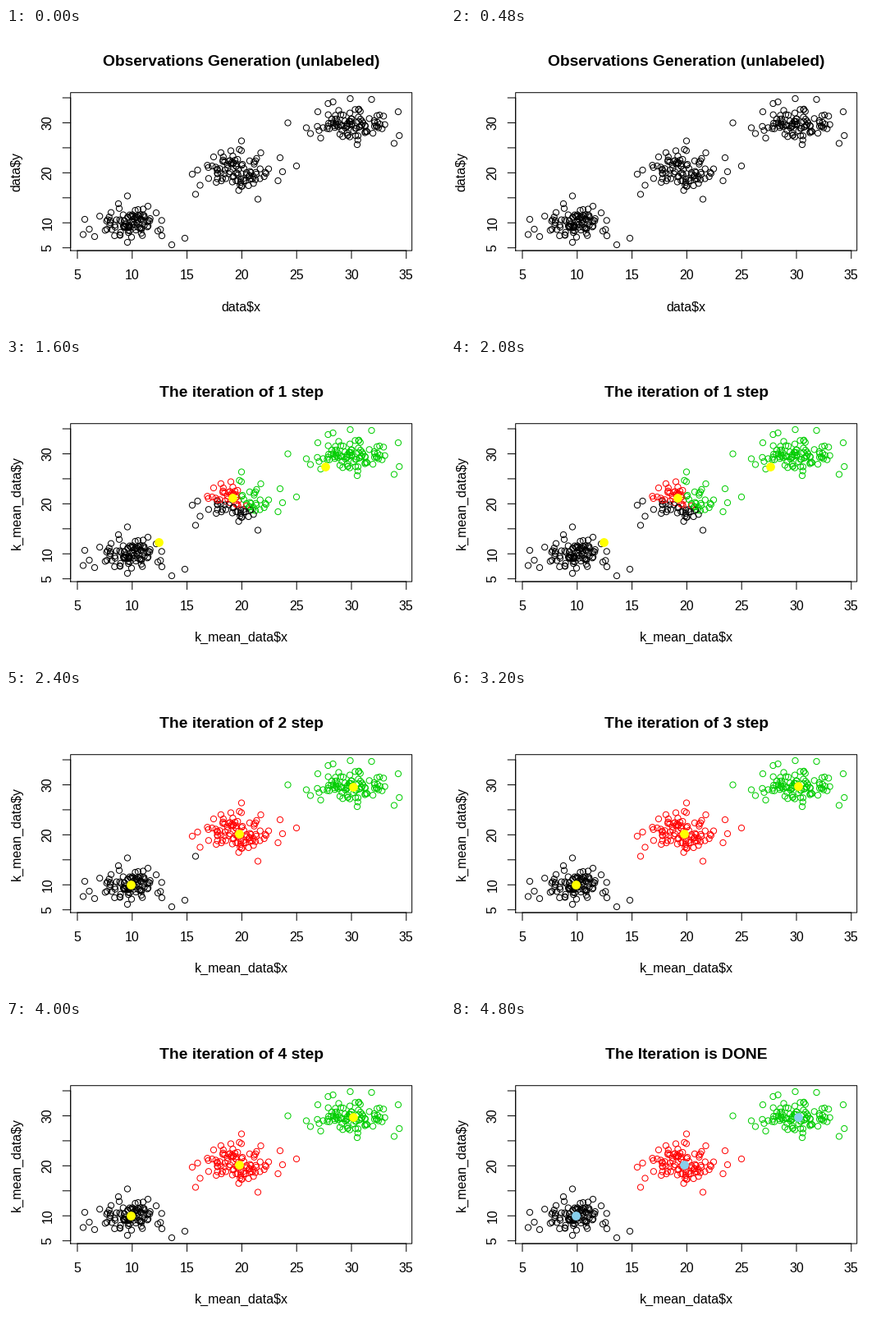
Write a matplotlib script that moves like this. It is 535x369 px and loops after 5.6 s.

```python
import numpy as np
import matplotlib.pyplot as plt
from matplotlib.animation import FuncAnimation

W, H, DPI = 535, 369, 64
PX = 72 / DPI                      # one pixel in points
LEFT, RIGHT, TOP, BOTTOM = 78.7, 494.7, 78.7, 271.1
XUNIT, YUNIT = 13.36, 6.09         # pixels per data unit
TICK = 9.6

BLACK, RED, GREEN = "#000000", "#ff0000", "#00cd00"
HUES = np.array([BLACK, RED, GREEN])
GREYS = np.array([BLACK, "#4c4c4c", "#787878"])

# Each cloud: centre, spread, stray points in label 0, stray points in label 2
CLOUDS = [
    ((151, 236.5), (21, 10),
     [(94, 251.5), (96, 233), (101.5, 245), (148, 204.5), (137, 214),
      (148, 261), (190, 253), (218, 256), (173, 217)],
     [(108, 254), (202, 264)]),
    ((283, 173), (20, 13),
     [(227, 178), (233.5, 173), (231, 202.5), (236.5, 191.5), (253, 157),
      (287, 137.5), (274, 149.5), (310.5, 152), (331.5, 186)],
     [(334, 158), (337, 175), (354, 168), (307, 208.5)]),
    ((422, 116.5), (22, 10.5),
     [(366, 121.5), (371, 128.5), (380, 102), (392.5, 92), (419.5, 86),
      (478, 102), (479.3, 131), (473, 140.5), (383.5, 134)],
     [(343.5, 115.5), (398.5, 90), (445.5, 87), (428, 142)]),
]

START = [(275, 182), (284, 174.5), (297, 173)]
FIRST = [(186, 223), (275.5, 169), (389, 130.5)]
SECOND = [(152, 237), (284, 174.5), (422.5, 117.5)]
FINAL = [(151.5, 237), (283.5, 175), (422.5, 117.3)]


def make_points(size=100, reach=2):
    rng = np.random.default_rng(12)
    points, labels = [], []
    for centre, spread, dark, light in CLOUDS:
        points += dark + light
        labels += [0] * len(dark) + [2] * len(light)
        missing = size - len(dark) - len(light)
        while missing:
            step = rng.normal(size=2)
            if np.hypot(*step) < reach:
                points.append(tuple(np.array(centre) + step * spread))
                labels.append(rng.integers(3))
                missing -= 1
    return np.array(points), np.array(labels)


def nearest(centres):
    gap = (points[:, None] - np.array(centres)) / (XUNIT, YUNIT)
    return np.hypot(gap[..., 0], gap[..., 1]).argmin(axis=1)


points, labels = make_points()

fig = plt.figure(figsize=(W / DPI, H / DPI), dpi=DPI, facecolor="white")
ax = fig.add_axes([0, 0, 1, 1])
ax.set_xlim(0, W)
ax.set_ylim(H, 0)
ax.axis("off")


def line(xs, ys):
    ax.plot(xs, ys, color=BLACK, lw=PX, snap=False, solid_capstyle="round")


def text(x, y, label, size=16, **style):
    return ax.text(x, y, label, fontsize=size * PX, family="Liberation Sans",
                   ha="center", va="baseline", rotation_mode="anchor",
                   parse_math=False, **style)


line([LEFT, RIGHT, RIGHT, LEFT, LEFT], [BOTTOM, BOTTOM, TOP, TOP, BOTTOM])

ticks = range(5, 36, 5)
xs = [87 + XUNIT * (v - 5) for v in ticks]
ys = [267.7 - YUNIT * (v - 5) for v in ticks]
line([xs[0], xs[-1]], [BOTTOM, BOTTOM])
line([LEFT, LEFT], [ys[0], ys[-1]])
for value, x, y in zip(ticks, xs, ys):
    line([x, x], [BOTTOM, BOTTOM + TICK])
    line([LEFT, LEFT - TICK], [y, y])
    text(x, 305.7, str(value))
    if value in (5, 10, 20, 30):
        text(55.7, y, str(value), rotation=90)

mid_x, mid_y = (LEFT + RIGHT) / 2, (TOP + BOTTOM) / 2
title = text(mid_x, 46.5, "", size=19.2, weight="bold")
xlabel = text(mid_x, 344.1, "")
ylabel = text(17.3, mid_y, "", rotation=90)

dots = ax.scatter(*points.T, s=(7.2 * PX) ** 2, facecolors="none",
                  edgecolors=BLACK, linewidths=PX, zorder=3)
marks = ax.scatter(*np.array(START).T, s=(10.8 * PX) ** 2, linewidths=0,
                   zorder=4)

# Title, point colours, centres, centre colour
settled = HUES[nearest(SECOND)]
SCENES = [
    ("Observations Generation (unlabeled)", [BLACK], START, "none"),
    ("The First Step of K-means algorithm", GREYS[labels], START, "#939393"),
    ("The iteration of 1 step", HUES[nearest(START)], FIRST, "#ffff00"),
    ("The iteration of 2 step", HUES[nearest(FIRST)], SECOND, "#ffff00"),
    ("The iteration of 3 step", settled, FINAL, "#ffff00"),
    ("The iteration of 4 step", settled, FINAL, "#ffff00"),
    ("The Iteration is DONE", settled, FINAL, "#87ceeb"),
]


def draw(i):
    heading, colours, centres, fill = SCENES[i]
    name = "k_mean_data" if i else "data"
    title.set_text(heading)
    xlabel.set_text(name + "$x")
    ylabel.set_text(name + "$y")
    dots.set_edgecolor(list(colours))
    marks.set_offsets(centres)
    marks.set_facecolor(fill)
    return title, xlabel, ylabel, dots, marks


anim = FuncAnimation(fig, draw, frames=len(SCENES), interval=800,
                     repeat=True, repeat_delay=0, blit=False)
plt.show()
```
